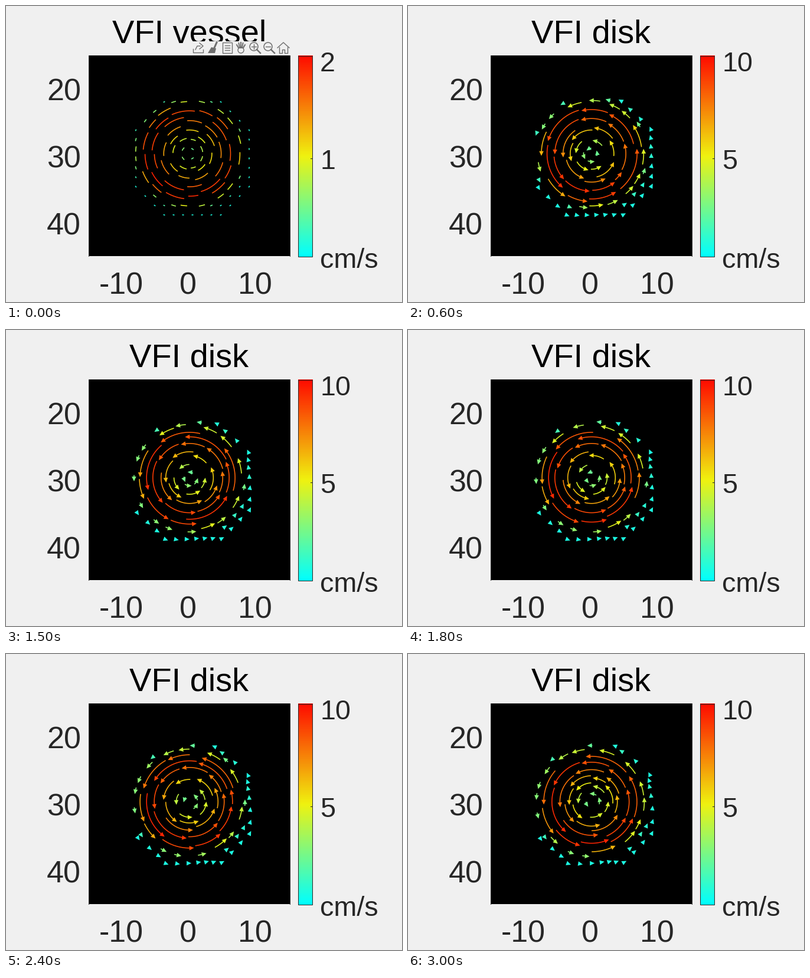
Recreate the animation shown at these times as a matplotlib script. Size 671 by 503 pixels, loop 3.1 s.

```python
import numpy as np
import matplotlib.pyplot as plt
from matplotlib.animation import FuncAnimation
from matplotlib.collections import LineCollection, PolyCollection
from matplotlib.colors import LinearSegmentedColormap
from matplotlib.patches import Circle, Polygon, Rectangle

W, H, DPI = 671, 503, 100
FRAMES, INTERVAL = 31, 100
PX = 72 / DPI  # one pixel in points
BG, INK, ICON = "#f0f0f0", "#262626", "#6e6e6e"

LEFT, TOP, SIDE = 140, 84, 341
UNIT = SIDE / 30  # pixels per data unit
CENTER = np.array([311.0, 251.0])
GRID_MIDDLE = np.array([316.0, 259.0])
STEP = 16

cmap = LinearSegmentedColormap.from_list(
    "flow", [(0, 1, 1), (0.94, 0.95, 0.06), (1, 0.04, 0)])


def make_seeds():
    """Polar positions of the square grid points inside a disc."""
    seeds = []
    for j in range(-6, 7):
        for i in range(-6, 7):
            if np.hypot(i, j) < 7:
                dx, dy = GRID_MIDDLE + STEP * np.array([i, j]) - CENTER
                seeds.append((np.hypot(dx, dy), np.arctan2(-dy, dx)))
    return seeds


def speed(r):
    """Solid rotation inside, smooth fall to rest at the rim."""
    return (1.2 + 0.12 * r) / (1 + np.exp((r - 86) / 6))


def on_circle(r, angle):
    angle = np.asarray(angle)
    return CENTER + r * np.stack([np.cos(angle), -np.sin(angle)], axis=-1)


def clearance(points, drawn):
    if not len(drawn):
        return np.full(len(points), np.inf)
    diff = points[:, None, :] - drawn[None, :, :]
    return np.hypot(diff[..., 0], diff[..., 1]).min(axis=1)


def arrow_head(r, angle):
    tip = on_circle(r, angle)
    along = np.array([-np.sin(angle), -np.cos(angle)])
    side = np.array([-along[1], along[0]])
    base = tip - 4 * along
    return [tip + 4 * along, base + 3.8 * side, base - 3.8 * side]


def grow(r, angle, half, drawn):
    """Extend an arc both ways until it meets another one."""
    offsets = np.linspace(0, half, int(half / 1.5) + 2) / r
    ends = []
    for way in (-1, 1):
        free = clearance(on_circle(r, angle + way * offsets), drawn) > 7
        count = len(free) if free.all() else max(int(np.argmin(free)), 1)
        ends.append(angle + way * offsets[count - 1])
    tail, front = ends
    return min(tail, front - 2 / r), front


def streaks(n):
    """Arcs, heads and colours of the streaks that do not collide."""
    arcs, heads, colors = [], [], []
    drawn = np.empty((0, 2))
    for r, start in SEEDS:
        v = speed(r)
        angle = start + n * 0.6 * v / r
        gap = 5 if r > 100 else 9.5
        if clearance(on_circle(r, [angle]), drawn)[0] < gap:
            continue
        length = 1.2 * v ** 1.6 if n == 0 else v ** 2
        tail, front = grow(r, angle, max(length, 3) / 2, drawn)
        count = int((front - tail) * r / 2) + 2
        points = on_circle(r, np.linspace(tail, front, count))
        drawn = np.vstack([drawn, points])
        arcs.append(points)
        heads.append(arrow_head(r, front))
        tint = v * (1 + 0.06 * np.cos(angle - 3.9))
        colors.append(cmap(max(tint, 0.6) / 10))
    return arcs, heads, colors


SEEDS = make_seeds()

fig = plt.figure(figsize=(W / DPI, H / DPI), dpi=DPI, facecolor=BG)
ax = fig.add_axes([0, 0, 1, 1])
ax.axis("off")


def label(x, y, text, size, color=INK, ha="left"):
    return ax.text(x, y, text, fontsize=size * PX, color=color,
                   family="Liberation Sans", ha=ha, va="baseline")


def line(xs, ys, color=INK, width=1, z=3):
    return ax.plot(xs, ys, color=color, lw=width * PX, zorder=z)[0]


# Plot area
ax.add_patch(Rectangle((LEFT, TOP), SIDE + 1, SIDE, fc="black", ec="none",
                       antialiased=False))
for x in (LEFT, LEFT + SIDE):
    line([x, x], [TOP, TOP + SIDE])
for value in (-10, 0, 10):
    label(LEFT + (value + 15) * UNIT - 2, 490, str(value), 52, ha="center")
for value in (20, 30, 40):
    label(69, TOP + (value - 15) * UNIT + 20, str(value), 52)

# Colour bar
ax.imshow(np.linspace(1, 0, 256)[:, None], cmap=cmap, extent=(495, 520, 426, 84),
          aspect="auto", interpolation="nearest", zorder=2)
ax.set_xlim(0, W)
ax.set_ylim(H, 0)
ax.add_patch(Rectangle((495, 85), 24, SIDE, fc="none", ec=INK, lw=PX, zorder=3))
line([516, 519], [259, 259])
label(532, 445, "cm/s", 46.8)
top_label = label(532, 111, "", 46.8)
mid_label = label(532, 277, "", 46.8)
title = label(0, 62, "", 56, "black")

flow = LineCollection([], linewidths=1.6 * PX, zorder=4)
tips = PolyCollection([], edgecolors="none", zorder=5)
ax.add_collection(flow)
ax.add_collection(tips)


def make_toolbar():
    parts = [ax.add_patch(Rectangle((314, 60), 167, 24, fc=BG, ec="none", zorder=6))]
    export, brush, tip, hand, zoom_in, zoom_out, home = range(326, 471, 24)
    mid = 71

    def stroke(cx, *pts, width=1.4):
        xs, ys = zip(*pts)
        parts.append(line([cx + x for x in xs], [mid + y for y in ys], ICON, width, 7))

    def shape(patch):
        parts.append(ax.add_patch(patch))

    def fill(cx, *pts):
        shape(Polygon([(cx + x, mid + y) for x, y in pts], fc=ICON, ec="none", zorder=7))

    stroke(export, (-9, 2), (-9, 8), (8, 8), (8, 3))
    stroke(export, (-5, 3), (-2, -3), (3, -3))
    stroke(export, (2, -8), (8, -3), (2, 2))

    stroke(brush, (7, -9), (3, 0), width=3)
    fill(brush, (-2, -1), (6, 1), (4, 9), (-8, 9))

    shape(Rectangle((tip - 7, mid - 9), 16, 18, fc="none", ec=ICON, lw=1.4 * PX, zorder=7))
    for y in (-4, 0, 4):
        stroke(tip, (-3, y), (5, y))

    shape(Circle((hand, mid + 4), 5, fc="none", ec=ICON, lw=1.4 * PX, zorder=7))
    for k in range(-2, 3):
        stroke(hand, (2 * k, 0), (3.5 * k, -9 + k * k), width=2)

    for cx in (zoom_in, zoom_out):
        shape(Circle((cx - 2, mid - 2), 7, fc="none", ec=ICON, lw=1.5 * PX, zorder=7))
        stroke(cx, (3, 3), (9, 9), width=2.4)
        stroke(cx, (-6, -2), (2, -2))
    stroke(zoom_in, (-2, -6), (-2, 2))

    stroke(home, (-10, 0), (0, -9), (10, 0))
    stroke(home, (-7, -1), (-7, 9), (-2, 9), (-2, 3), (2, 3), (2, 9), (7, 9), (7, -1))
    return parts


toolbar = make_toolbar()


def update(n):
    first = n == 0
    arcs, heads, colors = streaks(n)
    flow.set_segments(arcs)
    flow.set_color(colors)
    tips.set_verts([] if first else heads)
    tips.set_facecolor(colors)
    title.set_text("VFI vessel" if first else "VFI disk")
    title.set_x(180 if first else 209)
    top_label.set_text("2" if first else "10")
    mid_label.set_text("1" if first else "5")
    for part in toolbar:
        part.set_visible(first)
    return [flow, tips, title, top_label, mid_label, *toolbar]


anim = FuncAnimation(fig, update, frames=FRAMES, interval=INTERVAL,
                     init_func=lambda: update(0), repeat=True, repeat_delay=0, blit=False)
plt.show()
```
